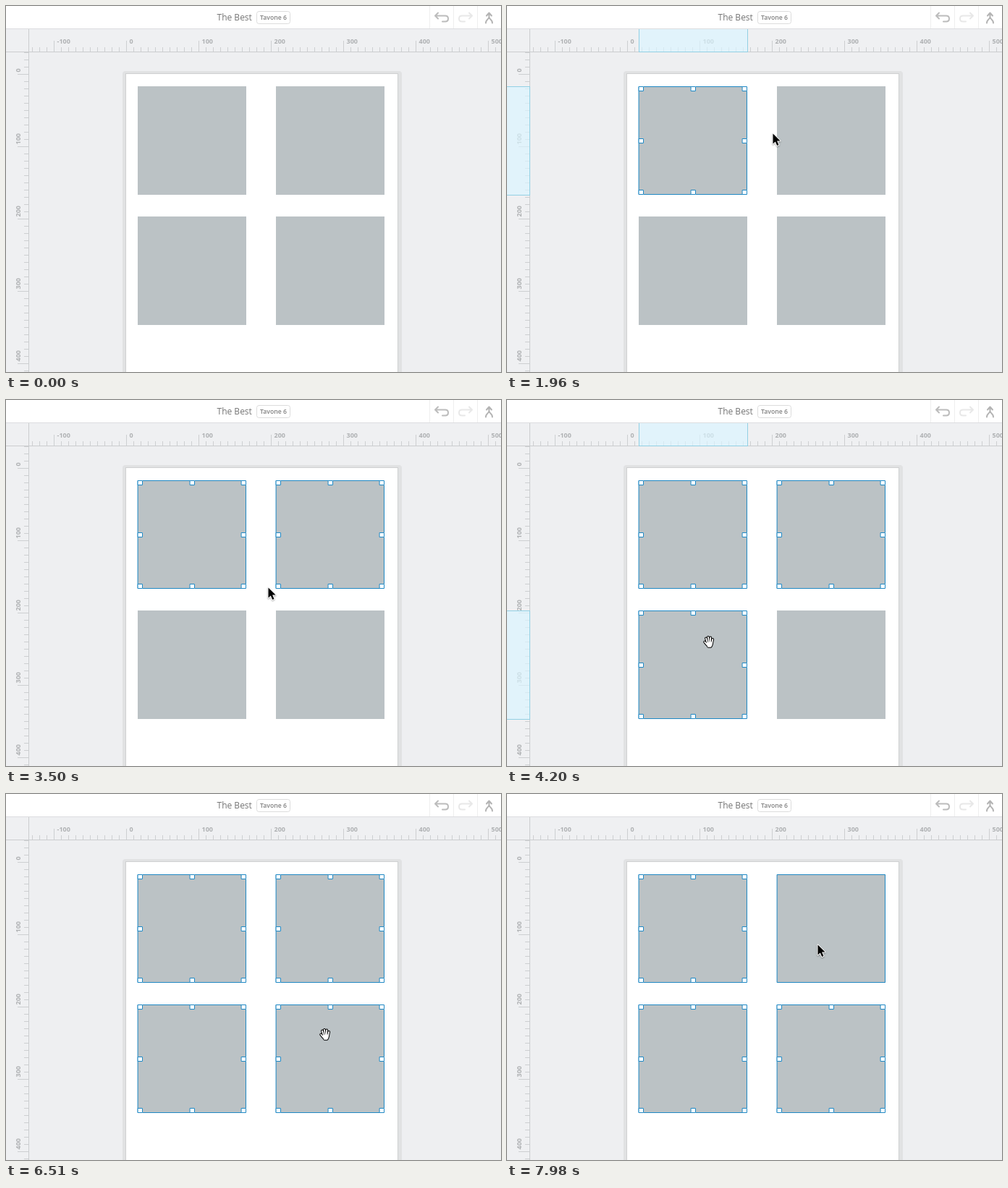
An HTML page with a canvas that plays this animation: 684x506 px, repeating every 8000 ms.

```html
<!DOCTYPE html>
<html lang="en">
<head>
<meta charset="utf-8">
<title>Shift-select</title>
<style>
  html, body { margin: 0; width: 100%; height: 100%; overflow: hidden; background: #eeeff1; }
  canvas { display: block; }
</style>
</head>
<body>
<canvas id="stage" width="684" height="506"></canvas>
<script>
const ctx = document.getElementById('stage').getContext('2d');
const LOOP = 8000, STEP = 70, W = 684, H = 506, SIZE = 150;
const BLUE = '#1f88c4', FONT = '"Open Sans", sans-serif';

// x, y, then the span of time in which the box is selected
const boxes = [
  { x: 182, y: 111, from: 1330, to: LOOP },
  { x: 373, y: 111, from: 2520, to: 7630 },
  { x: 182, y: 291, from: 4200, to: LOOP },
  { x: 373, y: 291, from: 5740, to: LOOP },
];

// Spans in which the rulers mark one box: from, to, box index
const rulerMarks = [
  [1330, 2520, 0], [2520, 2730, 1], [4200, 4340, 2], [5740, 5880, 3], [7420, 7630, 1],
];

// Pointer tip: time, x, y
const path = [
  [350, 262, 506], [1120, 241, 186], [1680, 241, 186], [1960, 367, 176], [2170, 424, 169],
  [3220, 424, 169], [3500, 362, 259], [3780, 296, 311], [3850, 296, 311], [3990, 277, 331],
  [4620, 277, 331], [5320, 440, 340], [6440, 440, 340], [6720, 435, 270], [6790, 435, 270],
  [7000, 432, 227], [7210, 429, 209], [7910, 429, 209], [7980, 429, 208], [LOOP, 429, 208],
];

// Smooth curve through the points that rests wherever the pointer rests
function slope(i, axis) {
  const a = path[i - 1], b = path[i], c = path[i + 1];
  if (!a || !c || (b[axis] - a[axis]) * (c[axis] - b[axis]) <= 0) return 0;
  return (c[axis] - a[axis]) / (c[0] - a[0]);
}

function pointerAt(t) {
  let i = 0;
  while (i < path.length - 2 && path[i + 1][0] <= t) i++;
  const a = path[i], b = path[i + 1], span = b[0] - a[0], u = (t - a[0]) / span;
  const mix = u * u * (3 - 2 * u);
  return [1, 2].map(axis => Math.round(
    a[axis] + (b[axis] - a[axis]) * mix
    + slope(i, axis) * span * u * (1 - u) ** 2
    - slope(i + 1, axis) * span * u * u * (1 - u)));
}

function fill(color, x, y, w, h) {
  ctx.fillStyle = color;
  ctx.fillRect(x, y, w, h);
}

function text(str, x, y, font, color) {
  ctx.font = `${font} ${FONT}`;
  ctx.fillStyle = color;
  ctx.fillText(str, x, y);
}

function stroke(d, color, width) {
  ctx.strokeStyle = color;
  ctx.lineWidth = width;
  ctx.stroke(new Path2D(d));
}

function drawToolbar() {
  fill('#fff', 0, 0, W, 31);
  fill('#dcdddf', 0, 31, W, 1);
  text('The Best', 291.5, 20, '12px', '#747474');
  ctx.beginPath();
  ctx.roundRect(346.5, 7.5, 46, 17, 3);
  ctx.strokeStyle = '#dcdcdc';
  ctx.lineWidth = 1;
  ctx.stroke();
  text('Tavone 6', 351, 19, '600 8.7px', '#808080');
  for (const x of [585, 618, 651]) fill('#eeeeee', x, 0, 1, 31);

  ctx.lineCap = ctx.lineJoin = 'round';
  stroke('M597 9.5L593 13.5L597 17.5M593.5 13.5H607Q611 13.5 611 17.5T607 21.5H603', '#bcbcbc', 2);
  stroke('M640 9.5L644 13.5L640 17.5M643.5 13.5H630Q626 13.5 626 17.5T630 21.5H634', '#e8e8e8', 2);
  stroke('M664 13.5L667.5 9.5L671 13.5M667.5 10V15Q667.5 17 665 19Q663 21 663 23.5M667.5 15Q667.5 17 670 19Q672 21 672 23.5', '#b4b4b4', 2);
}

function drawArtboard() {
  ctx.fillStyle = '#e1e2e3';
  ctx.beginPath();
  ctx.roundRect(161, 90, 386, H, 4);
  ctx.fill();
  fill('#cfd0d1', 165, 93, 377, H);
  fill('#fff', 166, 94, 375, H);
}

function drawRulers(marked) {
  const tick = '#cdcfd1', label = '#afb1b3';
  fill('#eff0f2', 0, 32, W, 31);
  fill('#eff0f2', 0, 32, 31, H);
  for (let v = -130; v <= 510; v += 10) {
    const x = 166 + v, y = 94 + v, major = v % 100 === 0;
    const length = major ? 15 : 6;
    fill(tick, x, 63 - length, 1, length);
    if (major) text(v, x + 4.5, 52, 'bold 9px', label);
    if (y < 64) continue;
    fill(tick, 31 - length, y, length, 1);
    if (!major) continue;
    ctx.save();
    ctx.translate(20, y - 2.5);
    ctx.rotate(-Math.PI / 2);
    text(v, 0, 0, 'bold 9px', label);
    ctx.restore();
  }
  fill('#cbcdcf', 0, 63, W, 1);
  fill('#cbcdcf', 31, 32, 1, H);
  if (!marked) return;

  const tint = 'rgba(218,245,255,.68)', edge = '#92d0e4';
  const { x, y } = marked;
  fill(tint, x, 32, SIZE + 1, 31);
  fill(tint, 0, y, 31, SIZE + 1);
  for (const end of [0, SIZE]) {
    fill(edge, x + end, 32, 1, 31);
    fill(edge, 0, y + end, 31, 1);
  }
  fill(edge, x, 63, SIZE + 1, 1);
  fill(edge, 31, y, 1, SIZE + 1);
}

function drawBox({ x, y }, selected, hovered) {
  fill('#bbc2c5', x, y, SIZE, SIZE);
  if (!selected && !hovered) return;
  ctx.strokeStyle = BLUE;
  ctx.lineWidth = 1;
  ctx.strokeRect(x + .5, y + .5, SIZE - 1, SIZE - 1);
  if (!selected) return;
  const spots = [0, 72, 143];
  for (const dx of spots) for (const dy of spots) {
    if (dx === 72 && dy === 72) continue;
    fill('#fff', x + dx, y + dy, 7, 7);
    ctx.strokeRect(x + dx + .5, y + dy + .5, 6, 6);
  }
}

function drawArrow() {
  const shape = new Path2D('M.5 .5V14.5L3.8 11.5L6.2 17L8.5 16L6.1 10.6H10.6Z');
  ctx.shadowColor = 'rgba(0,0,0,.35)';
  ctx.shadowBlur = 2;
  ctx.shadowOffsetY = 1;
  ctx.strokeStyle = '#fff';
  ctx.lineWidth = 2;
  ctx.stroke(shape);
  ctx.shadowColor = 'transparent';
  ctx.fillStyle = '#000';
  ctx.fill(shape);
}

function drawHand() {
  const fingers = 'M-5.8 .5L-3 4M-4 -4.5L-2 2M-1 -6L0 1M2.2 -5.6L2 1M5.2 -3.2L4 3';
  const palm = 'M-3 2.5L4 1.5L3.5 5L2.5 6.8H-1Z';
  ctx.translate(2, 3);
  stroke(fingers, '#000', 3.8);
  stroke(palm, '#000', 3.8);
  stroke(fingers, '#fff', 1.8);
  stroke(palm, '#fff', 1.8);
  ctx.fillStyle = '#fff';
  ctx.fill(new Path2D(palm));
}

function draw(now) {
  const t = Math.floor(now % LOOP / STEP) * STEP;
  const [px, py] = pointerAt(Math.max(t, 350));
  const visible = t >= 420;
  const isSelected = b => t >= b.from && t < b.to;
  const isUnder = b => visible && px >= b.x && px < b.x + SIZE && py >= b.y && py < b.y + SIZE;
  const mark = rulerMarks.find(([from, to]) => t >= from && t < to);

  fill('#eeeff1', 0, 0, W, H);
  drawArtboard();
  drawRulers(mark && boxes[mark[2]]);
  drawToolbar();
  for (const b of boxes) drawBox(b, isSelected(b), isUnder(b));

  if (visible) {
    ctx.save();
    ctx.translate(px, py);
    if (boxes.some(b => isUnder(b) && isSelected(b))) drawHand();
    else drawArrow();
    ctx.restore();
  }
}

const start = performance.now();
function tick() {
  draw(performance.now() - start);
  requestAnimationFrame(tick);
}
tick();
</script>
</body>
</html>
```
